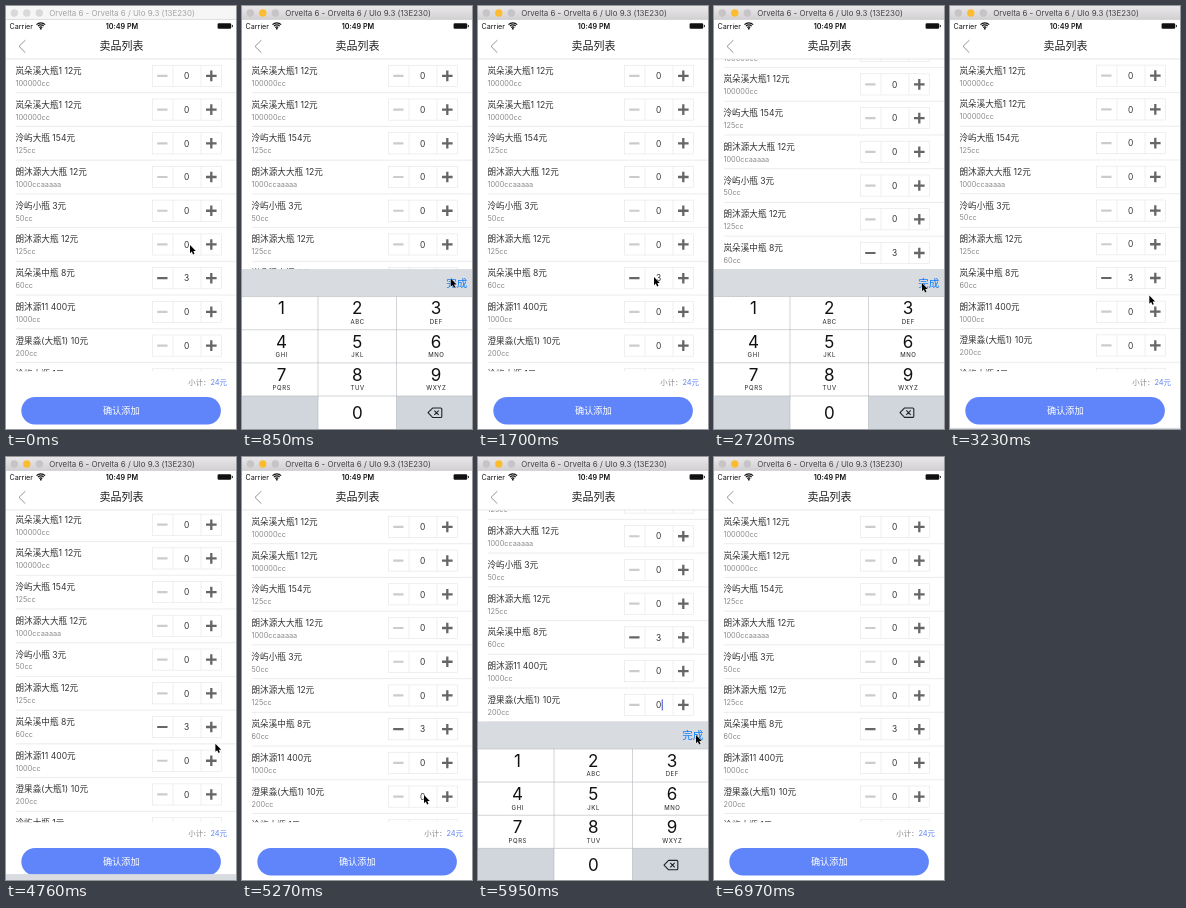
An HTML page that plays this animation: 230x423 px, repeating every 7.14 s.

```html
<!DOCTYPE html>
<html lang="zh-CN">
<head>
<meta charset="utf-8">
<title>卖品列表</title>
<style>
  html, body { margin: 0; width: 100%; height: 100%; overflow: hidden; background: #fff; }
  svg { display: block; width: 230px; height: 423px; }
  text { font-family: Inter, "Noto Sans CJK SC", "Noto Sans CJK", sans-serif; white-space: pre; }
</style>
</head>
<body>
<svg id="stage" viewBox="0 0 230 423">
  <defs>
    <linearGradient id="chrome" x2="0" y2="1">
      <stop offset="0" stop-color="#e9e7e9"/>
      <stop offset="1" stop-color="#d2d0d2"/>
    </linearGradient>
    <clipPath id="view"><rect y="53" width="230" height="312.5"/></clipPath>
  </defs>
</svg>
<script>
const LOOP = 7140, STEP = 170;
const LIST_TOP = 53, ROW_H = 33.72, FOCUS_Y = 247, KEYS_TOP = 263;

const items = [
  ['岚朵溪大瓶1 12元', '100000cc'],
  ['岚朵溪大瓶1 12元', '100000cc'],
  ['泠屿大瓶 154元', '125cc'],
  ['朗沐源大大瓶 12元', '1000ccaaaaa'],
  ['泠屿小瓶 3元', '50cc'],
  ['朗沐源大瓶 12元', '125cc'],
  ['岚朵溪中瓶 8元', '60cc', 3],
  ['朗沐源11 400元', '1000cc'],
  ['澄果淼(大瓶1) 10元', '200cc'],
  ['泠屿大瓶 1元', '100cc'],
  ['泠屿中瓶 5元', '80cc'],
  ['朗沐源小瓶 6元', '60cc']
];

// Each edit: focused row, keyboard open and close times
const edits = [
  { row: 5, open: 300, close: 1220 },
  { row: 6, open: 2030, close: 2850 },
  { row: 7, open: 3620, close: 4480 },
  { row: 8, open: 5580, close: 6540 }
];

// Pointer stops: time, x, y
const stops = [
  [0, 184, 239], [170, 184, 239], [500, 186, 241], [950, 212, 277], [1250, 213, 278],
  [1700, 176, 271], [2060, 176, 271], [2500, 208, 276], [2720, 208, 277], [3000, 209, 278],
  [3500, 187, 304], [3910, 186, 303], [4300, 214, 277], [4600, 214, 278], [5270, 182, 338],
  [5620, 182, 338], [5950, 218, 278], [6560, 216, 279], [6900, 240, 300], [LOOP, 240, 300]
];

const stage = document.getElementById('stage');

function el(parent, tag, attrs) {
  const node = document.createElementNS('http://www.w3.org/2000/svg', tag);
  for (const key in attrs) node.setAttribute(key, attrs[key]);
  parent.append(node);
  return node;
}
const group = (parent, attrs) => el(parent, 'g', attrs);
const rect = (parent, x, y, width, height, fill, more) =>
  el(parent, 'rect', { x, y, width, height, fill, ...more });
const path = (parent, d, stroke, width, more) =>
  el(parent, 'path', { d, stroke, 'stroke-width': width, fill: 'none', ...more });

// Text placed by the vertical centre of its capitals
function label(parent, x, cy, size, fill, str, more) {
  const node = el(parent, 'text', { x, y: cy + size * 0.36, 'font-size': size, fill, ...more });
  node.textContent = str;
  return node;
}
const MID = { 'text-anchor': 'middle' };
const rowCentre = i => LIST_TOP + ROW_H * (i + 0.5);

function drawRow(list, [name, spec, count = 0], i) {
  const c = rowCentre(i), top = c - 10.6;
  label(list, 9.5, c - 5.1, 8.6, '#333', name);
  label(list, 9.5, c + 7.3, 7.3, '#8a8a8a', spec);
  rect(list, 146.5, top, 69, 21.2, '#fff', { stroke: '#e8e8e8', 'stroke-width': 0.7 });
  path(list, `M167 ${top}v21.2M195 ${top}v21.2`, '#e8e8e8', 0.7);
  path(list, `M151.2 ${c}h10.3`, count ? '#666' : '#ccc', 2.2);
  path(list, `M200 ${c}h10.6M205.3 ${c - 5.3}v10.6`, '#666', 2.3);
  label(list, 180.6, c + 0.2, 8.4, '#333', count, MID);
  path(list, `M10 ${c + ROW_H / 2}H230`, '#e4e4e4', 0.7);
}

function drawHeader() {
  rect(stage, 0, 0, 230, LIST_TOP, '#fff');
  path(stage, 'M0 53H230', '#dcdcdc', 0.7);
  path(stage, 'M19.3 34.2L13 40.4L19.3 46.6', '#777', 0.8);
  label(stage, 115.5, 40.4, 11, '#222', '卖品列表', MID);
  label(stage, 3.5, 20, 7.2, '#111', 'Carrier');
  for (const r of [2, 4, 6])
    path(stage, `M${34.8 - r * 0.72} ${23 - r * 0.72}A${r} ${r} 0 0 1 ${34.8 + r * 0.72} ${23 - r * 0.72}`, '#111', 1.2);
  el(stage, 'circle', { cx: 34.8, cy: 22.7, r: 0.9, fill: '#111' });
  label(stage, 116, 20, 7.2, '#111', '10:49 PM', { ...MID, 'font-weight': 600 });
  rect(stage, 211.6, 17.2, 13.6, 5.6, '#111', { rx: 1.2 });
  rect(stage, 225.9, 18.9, 0.9, 2.2, '#111');
}

function drawTitleBar() {
  const bar = rect(stage, 0, 0, 230, 13.5);
  path(stage, 'M0 13.4H230', '#bdbdbd', 0.5);
  const dots = [8.3, 20.8, 33.3].map(cx => el(stage, 'circle', { cx, cy: 7, r: 3.7 }));
  const title = label(stage, 116, 7.2, 7.9, '#444', 'Orvelta 6 - Orvelta 6 / Ulo 9.3 (13E230)', MID);
  return active => {
    bar.setAttribute('fill', active ? 'url(#chrome)' : '#f6f6f6');
    dots.forEach((d, i) => d.setAttribute('fill', !active ? '#d9d9d9' : i === 1 ? '#fdbc2e' : '#c6c4c6'));
    title.setAttribute('fill', active ? '#444' : '#a4a4a4');
  };
}

function drawFooter() {
  rect(stage, 0, 365.5, 230, 58, '#fff');
  const total = label(stage, 221, 376.2, 7.4, '#888', '小计：', { 'text-anchor': 'end' });
  const sum = el(total, 'tspan', { fill: '#5f80f5' });
  sum.textContent = '24元';
  rect(stage, 15.3, 391, 199.6, 27.5, '#6085fb', { rx: 13.75 });
  label(stage, 115.3, 404.8, 9.2, '#fff', '确认添加', MID);
}

function drawKeyboard() {
  const pad = group(stage, {});
  rect(pad, 0, 0, 230, 27.5, '#d8dbdf');
  label(pad, 225.2, 13.8, 10.5, '#0a7bff', '完成', { 'text-anchor': 'end' });
  rect(pad, 0, 27.5, 230, 133, '#fff');
  const keyH = 33.15, cols = [39.5, 115.3, 194];
  const letters = ['', 'ABC', 'DEF', 'GHI', 'JKL', 'MNO', 'PQRS', 'TUV', 'WXYZ'];
  letters.forEach((abc, i) => {
    const x = cols[i % 3], y = 27.5 + keyH * Math.floor(i / 3);
    label(pad, x, y + 11.8, 17, '#111', i + 1, MID);
    label(pad, x + 0.3, y + 25.3, 6, '#222', abc, { ...MID, 'letter-spacing': 0.6 });
  });
  const last = 27.5 + keyH * 3;
  rect(pad, 0, last, 76, 34, '#d1d5dc');
  rect(pad, 154.5, last, 76, 34, '#d1d5dc');
  label(pad, cols[1], last + 16.7, 17, '#111', 0, MID);
  const lines = [0, 1, 2, 3].map(r => `M0 ${27.5 + keyH * r}H230`).join('');
  path(pad, lines + 'M76 27.5V161M154.5 27.5V161', '#b4b7bc', 0.6);
  const m = last + 16.7;
  path(pad, `M186 ${m}l4.6 -4.7h8.2q1 0 1 1v7.4q0 1 -1 1h-8.2z` +
    `M192.3 ${m - 2.2}l4.4 4.4m0 -4.4l-4.4 4.4`, '#222', 1.1, { 'stroke-linejoin': 'round' });
  return pad;
}

const view = group(stage, { 'clip-path': 'url(#view)' });
const list = group(view, {});
items.forEach((item, i) => drawRow(list, item, i));
const caret = rect(list, 183.7, 0, 1.1, 11, '#4a5fd6');
drawFooter();
drawHeader();
const setActive = drawTitleBar();
const keyboard = drawKeyboard();
const pointer = group(stage, {});
el(pointer, 'path', {
  d: 'M0 0V8.2L1.8 6.5L3.1 9.4L4.5 8.7L3.3 6H5.8Z',
  fill: '#000', stroke: '#fff', 'stroke-width': 0.7, 'paint-order': 'stroke'
});

// Critically damped spring, 0 to 1
function spring(ms) {
  if (ms <= 0) return 0;
  const x = 18.26 * ms / 1000;
  return 1 - (1 + x) * Math.exp(-x);
}

function pointerAt(t) {
  const i = stops.findIndex(s => s[0] > t);
  const [t0, x0, y0] = stops[i - 1], [t1, x1, y1] = stops[i];
  const u = (t - t0) / (t1 - t0), k = u * u * (3 - 2 * u);
  return [x0 + (x1 - x0) * k, y0 + (y1 - y0) * k];
}

const move = (node, x, y) => node.setAttribute('transform', `translate(${x.toFixed(2)} ${y.toFixed(2)})`);
const show = (node, on) => node.setAttribute('visibility', on ? 'visible' : 'hidden');

function render(t) {
  setActive(t >= STEP);
  const edit = edits.findLast(e => t >= e.open);
  let shown = 0, scroll = 0, blink = false;
  if (edit) {
    shown = spring(t - edit.open) - spring(t - edit.close);
    if (shown < 0.006) shown = 0;
    scroll = Math.max(0, rowCentre(edit.row) - FOCUS_Y) * shown;
    blink = t < edit.close && (t - edit.open) % 1000 < 550;
    caret.setAttribute('y', rowCentre(edit.row) - 5.5);
  }
  move(list, 0, -scroll);
  show(caret, blink);
  show(keyboard, shown > 0);
  move(keyboard, 0, KEYS_TOP + (423 - KEYS_TOP) * (1 - shown));
  move(pointer, ...pointerAt(t));
}

const start = performance.now();
function tick() {
  const t = (performance.now() - start) % LOOP;
  render(Math.floor(t / STEP) * STEP);
  requestAnimationFrame(tick);
}
tick();
</script>
</body>
</html>
```
